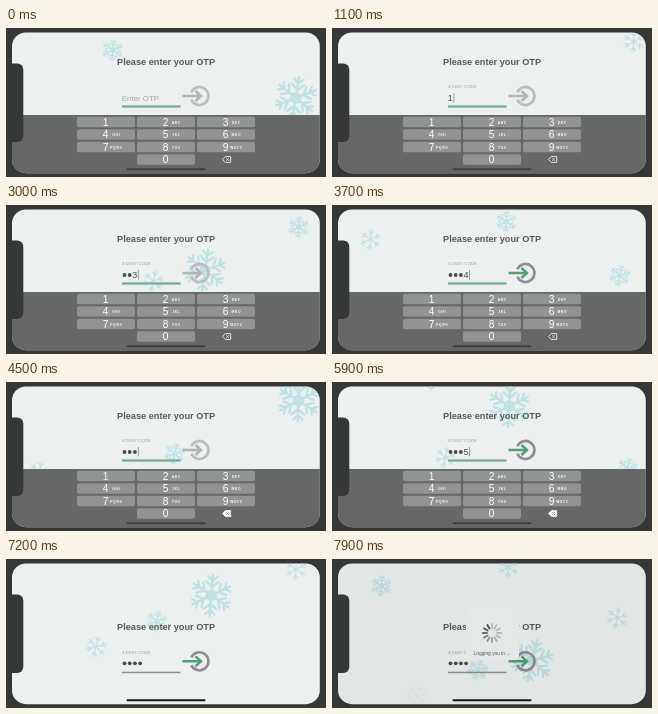
Write an HTML page that moves like this. It is 320x149 px and loops after 8000 ms.

```html
<!DOCTYPE html>
<html lang="en">
<head>
<meta charset="utf-8">
<title>One-time code entry</title>
<style>
  html, body { margin: 0; width: 100%; height: 100%; overflow: hidden; background: #363737; }
  svg { display: block; width: 100vw; height: 100vh; }
  text { font-family: "Liberation Sans", Arial, sans-serif; }
  .flake { fill: none; stroke: #b3dfe2; stroke-linecap: round; }
  .keys text { fill: #fff; text-anchor: middle; }
</style>
</head>
<body>
<svg id="stage" viewBox="0 0 320 149">
  <defs>
    <clipPath id="screen"><rect x="6" y="4.400" width="307.800" height="140.800" rx="14"/></clipPath>
    <path id="full" d="M0 0V-1M-.22 -.9L0 -.7L.22 -.9M-.3 -.66L0 -.4L.3 -.66M0 -.24L.208 -.12"/>
    <path id="plain" d="M0 0V-1M-.24 -.82L0 -.55L.24 -.82"/>
  </defs>
  <rect width="320" height="149" fill="#363737"/>
  <g clip-path="url(#screen)">
    <rect width="320" height="149" fill="#ecf0ef"/>
    <g id="snow"></g>
    <g id="form">
      <text x="111" y="36.500" font-size="9.200" font-weight="bold" fill="#595a5a">Please enter your OTP</text>
      <text id="hint" x="115.800" y="73" font-size="7.900" fill="#a4a9a7">Enter OTP</text>
      <text id="label" x="116" y="60.300" font-size="4.350">4 DIGIT CODE</text>
      <g id="dots" fill="#4b4c4c"></g>
      <text id="digit" y="73.200" font-size="9" fill="#4b4c4c"></text>
      <rect id="caret" y="65" width=".8" height="9.500" fill="#77908a"/>
      <rect id="line" x="116" width="58.500"/>
      <path id="ring" d="M185.300 64.200A9 9 0 1 1 185.300 71.800" fill="none" stroke-width="2.700"/>
      <path id="arrow" d="M176.500 68H194M189.500 63L195 68L189.500 73" fill="none" stroke-width="2.500"/>
    </g>
    <g id="pad" class="keys">
      <rect y="87" width="320" height="70" fill="#616262" fill-opacity=".96"/>
    </g>
    <rect id="home" x="120.500" y="140.300" width="79" height="1.900" rx=".95"/>
    <g id="dialog">
      <rect width="320" height="149" fill="#000" fill-opacity=".045"/>
      <rect x="134" y="49" width="53" height="52" rx="4" fill="#e4e8e7"/>
      <g id="spinner"></g>
      <text x="160" y="96" font-size="4.850" text-anchor="middle" fill="#5c5d5d">Logging you in ...</text>
    </g>
  </g>
  <rect x="-10" y="35.500" width="27.300" height="78.500" rx="6" fill="#363737"/>
</svg>
<script>
const LOOP = 8000, STEP = 100, HIDE = 6200, LOGIN = 7400;
const $ = id => document.getElementById(id);
const clamp = v => Math.max(0, Math.min(1, v));
const ease = v => 1 - (1 - clamp(v)) ** 3;

function set(el, attrs) {
  for (const k in attrs) el.setAttribute(k, attrs[k]);
}
function add(parent, tag, attrs, text = "") {
  const el = document.createElementNS("http://www.w3.org/2000/svg", tag);
  set(el, attrs);
  el.textContent = text;
  return parent.appendChild(el);
}
const show = (el, on) => set(el, { visibility: on ? "visible" : "hidden" });

// Where (x) and when (s) flakes enter at the top edge.
const large = [[295, -0.75], [204, 2.3], [294, 4.3], [179, 5.64], [208, 6.81]];
const small = [
  [109, -0.32], [303, 0.9], [98, 1.36], [155, 1.9], [295, 2.68], [42, 3.2], [176, 3.46],
  [121, 4.81], [304, 4.65], [99, 5.93], [157, 6.3], [291, 7.05], [52, 7.51], [177, 7.78]
];
function makeFlake([x, enter], r, shape) {
  const el = add($("snow"), "g", { class: "flake", "stroke-width": 0.11 });
  for (let a = 0; a < 360; a += 60) add(el, "use", { href: shape, transform: `rotate(${a})` });
  return { el, x, enter, r };
}
const flakes = [
  ...large.map(p => makeFlake(p, 21, "#full")),
  ...small.map((p, i) => makeFlake(p, 10.5, i % 2 ? "#plain" : "#full"))
];

// Bigger flakes are nearer, so they fall faster; all drift a little to the left.
function drawSnow(s) {
  for (const { el, x, enter, r } of flakes) {
    const age = s - enter, y = age * (45 + 2.3 * r);
    show(el, y > -r && y < 142);
    set(el, {
      transform: `translate(${x - 7 * age} ${y}) scale(${r}) rotate(${age * 12})`,
      opacity: 0.8 * clamp((142 - y) / 26)
    });
  }
}

const letters = ["", "ABC", "DEF", "GHI", "JKL", "MNO", "PQRS", "TUV", "WXYZ"];
const keys = {};
function addKey(n, col, row) {
  const x = 71 + col * 60, y = 88.8 + row * 12.5;
  keys[n] = add($("pad"), "rect", { x, y, width: 58, height: 10.4, rx: 1.8 });
  add($("pad"), "text", { x: x + 28.5, y: y + 8.7, "font-size": 10.2 }, n);
  add($("pad"), "text", {
    x: x + 39.3, y: y + 7, "font-size": 3.3, "font-weight": "bold", "letter-spacing": 0.7
  }, letters[n - 1]);
}
for (let n = 1; n <= 9; n++) addKey(n, (n - 1) % 3, Math.floor((n - 1) / 3));
addKey(0, 1, 3);
const erase = add($("pad"), "path", {
  d: "M216.500 131.500L219.300 128.600H224.700V134.400H219.300Z",
  stroke: "#fff", "stroke-width": 0.8, "stroke-linejoin": "round"
});
const cross = add($("pad"), "path", {
  d: "M220.200 130.200L222.800 132.800M222.800 130.200L220.200 132.800", "stroke-width": 0.7
});

const PITCH = 5.2;
const dots = [0, 1, 2, 3].map(i => add($("dots"), "circle", { cx: 118.5 + i * PITCH, cy: 70, r: 1.9 }));
const spokes = Array.from({ length: 12 }, (_, i) => add($("spinner"), "line", {
  x1: 160, x2: 160, y1: 69, y2: 64.8, stroke: "#444", "stroke-width": 1.8,
  "stroke-linecap": "round", transform: `rotate(${i * 30} 160 74)`
}));

const strokes = [[600, "1"], [1200, "2"], [1700, "3"], [3300, "4"], [4300, "erase"], [5600, "5"]];

function drawForm(t) {
  const done = strokes.filter(([at]) => at <= t).map(([, key]) => key);
  const code = done.reduce((s, key) => key === "erase" ? s.slice(0, -1) : s + key, "");
  const focus = t < HIDE + 100, last = done.at(-1);
  // The newest digit stays readable while the field has focus.
  const digit = focus && last && last !== "erase" ? last : "";
  const count = code.length, masked = count - digit.length, ready = count === 4;

  show($("hint"), !count);
  show($("label"), count);
  set($("label"), { fill: focus ? "#80ae9b" : "#969a9a" });
  dots.forEach((el, i) => show(el, i < masked));
  $("digit").textContent = digit;
  set($("digit"), { x: 115.8 + masked * PITCH });
  set($("caret"), { x: 116.3 + count * PITCH });
  show($("caret"), focus && count);
  set($("line"), focus ? { y: 77.4, height: 2.2, fill: "#74aa90" } : { y: 78.4, height: 1.5, fill: "#8d8e93" });
  set($("ring"), { stroke: ready ? "#918c98" : "#b9bdbc" });
  set($("arrow"), { stroke: ready ? "#559c7a" : "#b1b6b4" });

  const held = done.includes("erase");
  set(erase, { fill: held ? "#fff" : "none" });
  set(cross, { stroke: held ? "#616262" : "#fff" });
}

function drawPad(t) {
  const away = ease((t - HIDE) / 400);
  set($("form"), { transform: `translate(0 ${34.3 * away})` });
  set($("pad"), { transform: `translate(0 ${62 * away})` });
  set($("home"), { fill: away > 0.5 ? "#161717" : "#3f4040" });
  for (const n in keys) {
    const down = strokes.some(([at, key]) => key === n && t >= at && t < at + 200);
    set(keys[n], { fill: down ? "#565757" : "#929393" });
  }
}

function drawDialog(t) {
  set($("dialog"), { opacity: clamp((t - LOGIN) / 200) });
  const head = Math.floor(t / 83);
  spokes.forEach((el, i) => {
    const age = (head - i + 12) % 12;
    set(el, { opacity: Math.max(0.28, 0.95 - age * 0.1) });
  });
}

const start = performance.now();
function frame(now) {
  const t = Math.floor((Math.max(0, now - start) % LOOP) / STEP) * STEP;
  drawSnow(t / 1000);
  drawForm(t);
  drawPad(t);
  drawDialog(t);
  requestAnimationFrame(frame);
}
frame(start);
</script>
</body>
</html>
```
